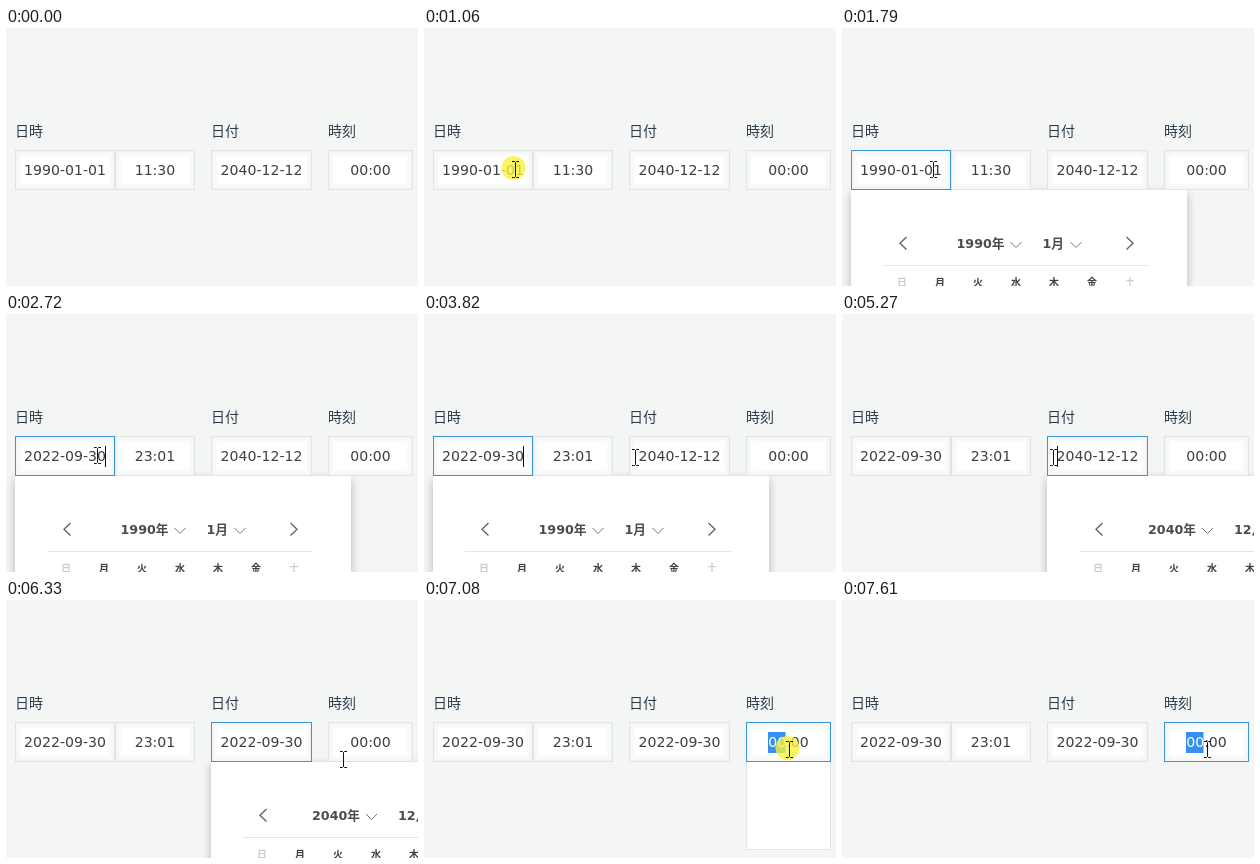
An HTML page that plays this animation: 412x258 px, repeating every 8000 ms.

```html
<!DOCTYPE html>
<html lang="ja">
<head>
<meta charset="utf-8">
<title>日時入力</title>
<style>
  html, body { margin: 0; width: 100%; height: 100%; overflow: hidden; background: #f4f6f5; }
  svg { display: block; }
  text { font-family: "DejaVu Sans", "Noto Sans CJK JP", "Noto Sans CJK", sans-serif; fill: #3c4146; white-space: pre; }
  .label { font: 14px "Noto Sans CJK JP", "Noto Sans CJK", sans-serif; fill: #2c3b47; }
  .value { font-size: 14.1px; text-anchor: middle; }
  .head { font-size: 12.7px; font-weight: bold; fill: #4a4d50; }
  .day { font: bold 10px "Noto Sans CJK JP", "Noto Sans CJK", sans-serif; text-anchor: middle; }
  .line { fill: none; stroke: #777; }
  .arrow { fill: none; stroke: #666; stroke-width: 1.4; }
</style>
</head>
<body>
<svg id="stage" width="412" height="258" viewBox="0 0 412 258">
  <defs>
    <filter id="soft" x="-20%" y="-20%" width="140%" height="140%">
      <feGaussianBlur stdDeviation="5"/>
    </filter>
  </defs>
</svg>
<script>
const LOOP = 8000;
const TICK = 66;          // pointer moves in steps of this length
const BLINK = 530;        // caret half period
const HOLD = 200;         // how long the mouse button stays down
const FOCUS_DELAY = 70;
const PANEL_TIME = 540;
const CLICKS = [1060, 4080, 7000];
const PASTES = [2720, 5600];

const stage = document.getElementById('stage');

function add(parent, tag, attrs = {}, content = '') {
  const el = document.createElementNS('http://www.w3.org/2000/svg', tag);
  for (const key in attrs) el.setAttribute(key, attrs[key]);
  el.textContent = content;
  parent.appendChild(el);
  return el;
}

const show = (el, on) => el.setAttribute('visibility', on ? 'visible' : 'hidden');
const within = (t, from, length) => t >= from && t < from + length;

// Calendar popups, cut off by the bottom of the stage
function makePopup(left, year, month) {
  const g = add(stage, 'g', { transform: `translate(${left} 162)` });
  add(g, 'rect', { y: 3, width: 336, height: 140, fill: '#000', opacity: 0.26, filter: 'url(#soft)' });
  add(g, 'rect', { width: 336, height: 140, fill: '#fff' });
  add(g, 'path', { class: 'arrow', d: 'M55.5 47l-6.5 6.3l6.5 6.3M275.5 47l6.5 6.3l-6.5 6.3' });

  const shift = month > 9 ? 4.5 : 0;
  add(g, 'text', { class: 'head', x: 105.5 - shift, y: 58 }, year + '年');
  add(g, 'text', { class: 'head', x: 191.5 - shift, y: 58 }, month + '月');
  for (const x of [159.5 - shift, 219.5 + shift]) {
    add(g, 'path', { class: 'line', d: `M${x} 52l5.5 5.5l5.5 -5.5` });
  }
  add(g, 'rect', { x: 32, y: 75, width: 266, height: 1, fill: '#e4e6e6' });
  [...'日月火水木金土'].forEach((day, i) => {
    const label = add(g, 'text', { class: 'day', x: 51 + 38 * i, y: 95.5 }, day);
    if (i % 6 === 0) label.style.fill = '#ccc';
  });
  return g;
}

const popups = [makePopup(9, 1990, 1), makePopup(205, 2040, 12)];
const timePanel = add(stage, 'rect', { x: 322.5, y: 161.5, width: 84, height: 88, fill: '#fff', stroke: '#e2e5e5' });

function makeField(x, width) {
  add(stage, 'rect', { x, y: 122, width, height: 40, fill: '#fff' });
  const ring = (d, attrs) => add(stage, 'rect', {
    x: x + d, y: 122 + d, width: width - 2 * d, height: 40 - 2 * d, fill: 'none', ...attrs
  });
  for (let i = 0; i < 6; i++) ring(i + 1.5, { stroke: '#6f7c7c', 'stroke-opacity': 0.08 * (1 - i / 6) });
  const border = ring(0.5);
  const mark = add(stage, 'rect', { x: x + 22, y: 132, width: 17.5, height: 21, fill: '#3390f0', visibility: 'hidden' });
  const text = add(stage, 'text', { class: 'value', x: x + width / 2, y: 147 });
  return { x, width, border, mark, text };
}

const dateTime = makeField(9, 100);
const clock = makeField(109, 80);
const date = makeField(205, 101);
const time = makeField(322, 85);
const fields = [dateTime, clock, date, time];
const hours = add(time.text, 'tspan', {}, '00');
add(time.text, 'tspan', {}, ':00');

[['日時', dateTime], ['日付', date], ['時刻', time]].forEach(([name, field]) =>
  add(stage, 'text', { class: 'label', x: field.x, y: 108 }, name));

const caret = add(stage, 'rect', { y: 132, width: 1, height: 21, fill: '#111' });
const halo = add(stage, 'circle', { cx: -1.5, cy: -1, r: 12, fill: '#faf23a', opacity: 0.78 });
const pointer = add(stage, 'g');
pointer.appendChild(halo);
const beam = add(pointer, 'path', {
  d: 'M-3 -7.5h2.5l1 1l1 -1h2.5M-3 8.5h2.5l1 -1l1 1h2.5M.5 -6.5v14',
  fill: 'none', stroke: '#111'
});
const arrow = add(pointer, 'path', {
  d: 'M.5 .5v16l3.7 -3.5l2.6 5.5l2.2 -1l-2.5 -5.3h5z',
  fill: '#fff', stroke: '#111'
});

// Each glide eases along a curve: start point, bend, end point
const glides = [
  { start: 130, length: 530, x: [229, 158, 91], y: [211, 166, 141] },
  { start: 3270, length: 550, x: [91, 151, 211], y: [141, 106, 143] },
  { start: 6130, length: 400, x: [211, 358, 362], y: [143, 170.5, 151] },
  { start: 6670, length: 130, x: [362, 364, 365], y: [151, 150, 149] }
];

const curve = ([a, b, c], u) => (1 - u) ** 2 * a + 2 * u * (1 - u) * b + u * u * c;

function pointerAt(t) {
  const glide = glides.filter(g => t >= g.start).pop();
  if (!glide) return null;
  const steps = Math.ceil(glide.length / TICK);
  const p = Math.min(1, (Math.floor((t - glide.start) / TICK) + 1) / steps);
  const u = p * p * (3 - 2 * p);
  return { x: Math.round(curve(glide.x, u)), y: Math.round(curve(glide.y, u)) };
}

function drawPointer(t) {
  const at = pointerAt(t);
  show(pointer, at);
  show(halo, CLICKS.some(click => within(t, click, HOLD)));
  if (!at) return;
  const overField = at.y >= 122 && at.y < 162 && fields.some(f => within(at.x, f.x, f.width));
  beam.style.display = overField ? '' : 'none';
  arrow.style.display = overField ? 'none' : '';
  pointer.setAttribute('transform', `translate(${at.x} ${at.y})`);
}

// The blink restarts whenever the caret is placed
const carets = [
  { start: CLICKS[0] + HOLD, x: 91 },
  { start: PASTES[0], x: 99 },
  { start: CLICKS[1] + HOLD / 2, x: 215 },
  { start: PASTES[1], x: 296 }
];

function drawCaret(t, focus) {
  const last = carets.filter(c => t >= c.start).pop();
  const lit = last && Math.floor((t - last.start) / BLINK) % 2 === 0;
  show(caret, lit && focus !== time);
  if (last) caret.setAttribute('x', last.x);
}

function draw(t) {
  const clicked = CLICKS.filter(click => t >= click + FOCUS_DELAY).length;
  const focus = [null, dateTime, date, time][clicked];
  for (const f of fields) f.border.setAttribute('stroke', f === focus ? '#3a96d2' : '#e0e4e4');

  dateTime.text.textContent = t < PASTES[0] ? '1990-01-01' : '2022-09-30';
  clock.text.textContent = t < PASTES[0] ? '11:30' : '23:01';
  date.text.textContent = t < PASTES[1] ? '2040-12-12' : '2022-09-30';
  show(time.mark, focus === time);
  hours.style.fill = focus === time ? '#fff' : '';

  show(popups[0], focus === dateTime);
  show(popups[1], focus === date);
  show(timePanel, within(t, CLICKS[2] + FOCUS_DELAY, PANEL_TIME));
  drawCaret(t, focus);
  drawPointer(t);
}

const start = performance.now();
function tick() {
  draw((performance.now() - start) % LOOP);
  requestAnimationFrame(tick);
}
tick();
</script>
</body>
</html>
```
